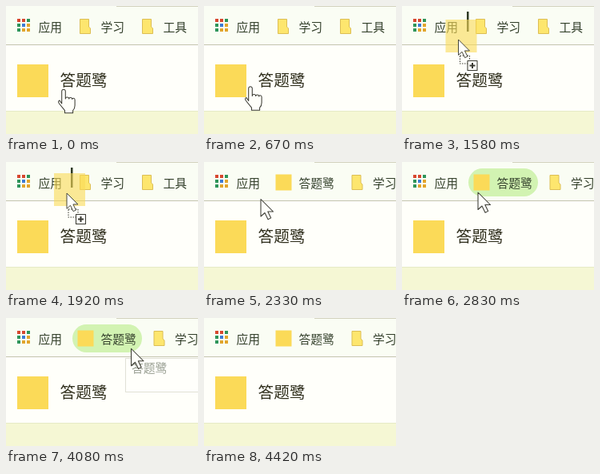
These frames come from a looping animation (240 by 160 pixels, 5080 ms). An HTML page:

```html
<!DOCTYPE html>
<html lang="zh-CN">
<head>
<meta charset="utf-8">
<title>拖动添加书签</title>
<style>
html, body { margin: 0; width: 100%; height: 100%; overflow: hidden; background: #fffffa; }
svg { display: block; width: 100vw; height: 100vh; }
text { font: 14.8px "Noto Sans CJK SC", "Noto Sans CJK", "Noto Sans", sans-serif; fill: #34402c; }
.title { font-size: 19.7px; fill: #2f2e1c; }
.logo { fill: #fbda58; }
.cursor { stroke: #3c3c34; stroke-width: 1.05; stroke-linejoin: round; fill: #fffffa; }
</style>
</head>
<body>
<svg viewBox="0 0 240 160">
  <defs>
    <path id="folder" d="M.5.5h11v9.500l2 2v6.500h-13z" fill="#fde66e" stroke="#dcbe55"/>
    <path id="arrow" d="M0 0v21.500l5-4.500 4 8.200 3.700-1.800-3.900-7.900h6.700z"/>
  </defs>

  <rect width="240" height="160" fill="#fffffa"/>
  <rect width="240" height="48" fill="#fafdf4"/>
  <rect y="131.500" width="240" height="29" fill="#f5f7d4"/>
  <path d="M0 131.500h240" stroke="#e6eac6"/>
  <path d="M138 .5h102" stroke="#d2d2be"/>
  <path d="M0 48.500h240" stroke="#c4c4b0"/>

  <rect id="pill" x="83" y="8" width="87" height="35" rx="17.500" fill="#d2f3b2"/>
  <g id="apps"></g>
  <text x="40.500" y="31.700">应用</text>

  <g id="added">
    <rect class="logo" x="89.500" y="15.500" width="20" height="20"/>
    <text x="118.500" y="31.700">答题鹭</text>
  </g>
  <g id="folders">
    <use href="#folder" x="92" y="16"/>
    <text x="118.500" y="31.700">学习</text>
    <use href="#folder" x="170" y="16"/>
    <text x="196.500" y="31.700">工具</text>
  </g>

  <rect class="logo" x="14" y="73" width="39" height="41"/>
  <text class="title" x="67.500" y="100.300">答题鹭</text>

  <g id="tip">
    <rect x="149.500" y="50.500" width="96" height="42" fill="#fffffc" stroke="#c4c4b4"/>
    <text x="157" y="68">答题鹭</text>
  </g>

  <rect id="marker" x="81" y="7" width="2.500" height="25" fill="#2e3a24"/>

  <g id="pointer">
    <rect id="ghost" class="logo" x="-16" y="-25" width="39" height="41" opacity=".6"/>
    <path id="hand" class="cursor" d="M-2.300 18V2.500a2.300 2.300 0 0 1 4.600 0V12q0-2 2.200-2t2.200 2q0-1.600 2-1.600t2 2q0-1.200 1.700-1.200t1.700 2v7q0 4-2.500 6.500v3H1.500v-3L-5.500 18q-2-3 .5-4z"/>
    <g id="forbidden" fill="none" stroke="#111" stroke-width="3.600">
      <circle r="10.500"/>
      <path d="M-7.400-7.400 7.400 7.400"/>
    </g>
    <g id="copy" class="cursor">
      <rect x="2" y="20" width="12" height="10" fill="none" stroke-dasharray="1.500 1.500"/>
      <use href="#arrow" transform="scale(.9)"/>
      <rect x="11.500" y="26.500" width="12" height="12"/>
      <path d="M17.500 29v7M14 32.500h7" stroke-width="2"/>
    </g>
    <use id="plain" class="cursor" href="#arrow"/>
  </g>
</svg>
<script>
const TICKS = 61, LOOP = 5080, TICK = 1000 / 12;
const $ = id => document.getElementById(id);
const fade = (id, alpha) => { $(id).style.opacity = alpha; };
const toggle = (id, on) => { $(id).style.display = on ? '' : 'none'; };

// Pointer hotspot: [tick, x, y]
const path = [
  [0, 72, 104], [4, 82, 109], [6, 82, 109], [8, 58, 100.5], [12, 30, 98],
  [13, 30, 98], [16, 59.5, 78], [18, 69, 47], [20, 72, 37], [23, 76, 39],
  [24, 76, 39], [28, 71, 46.5], [30, 72, 44], [32, 72, 44], [36, 118, 32],
  [39, 139, 26.5], [48, 139, 26.5], [50, 174, 50], [53, 244, 98]
];

const colors = ['#d8482f', '#d8482f', '#2f955a', '#2f955a', '#3d7bd6', '#e2a52c', '#2f955a', '#e2a52c', '#e2a52c'];
$('apps').innerHTML = colors.map((c, i) =>
  `<rect x="${14 + i % 3 * 6}" y="${16 + Math.floor(i / 3) * 6}" width="4" height="4" fill="${c}"/>`).join('');

const ramp = (k, from, to) => Math.min(1, Math.max(0, (k - from) / (to - from)));

function position(k) {
  const next = path.findIndex(p => p[0] > k);
  if (next < 0) return path[path.length - 1].slice(1);
  const [k0, x0, y0] = path[next - 1], [k1, x1, y1] = path[next];
  const f = ramp(k, k0, k1);
  return [x0 + (x1 - x0) * f, y0 + (y1 - y0) * f];
}

function draw(k) {
  const [x, y] = position(k);
  const dragging = k >= 14 && k < 25, dropped = k >= 25, overBar = y < 48;
  const hover = dropped && x > 83 && x < 170 && y > 8 && y < 43;

  $('pointer').setAttribute('transform', `translate(${x} ${y})`);
  toggle('pointer', k < 53);
  toggle('hand', k < 14);
  toggle('ghost', dragging);
  toggle('forbidden', dragging && !overBar);
  toggle('copy', dragging && overBar);
  toggle('marker', dragging && overBar);
  toggle('plain', dropped);
  toggle('added', dropped);
  toggle('pill', hover);
  fade('tip', ramp(k, 43, 46) * (1 - ramp(k, 48, 50)));
  $('folders').setAttribute('transform', `translate(${dropped ? 92.5 : 0} 0)`);
}

function frame() {
  // Lead by a few milliseconds, as changes fall on rounded hundredths.
  const t = performance.now() % LOOP;
  draw(Math.min(TICKS - 1, Math.floor((t + 4) / TICK)));
  requestAnimationFrame(frame);
}
frame();
</script>
</body>
</html>
```
